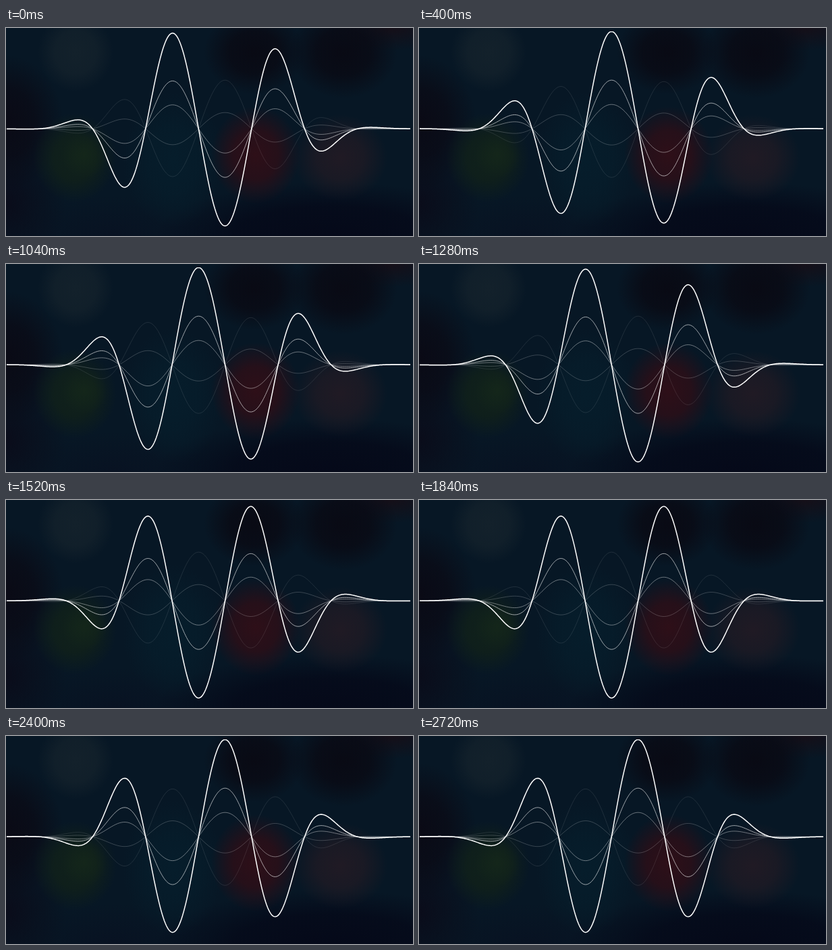
These frames come from a looping animation (603x308 px, 2800 ms). An HTML page with a canvas:

```html
<!DOCTYPE html>
<html lang="en">
<head>
<meta charset="utf-8">
<title>Wave</title>
<style>
  html, body { margin: 0; width: 100%; height: 100%; overflow: hidden; }
  body {
    position: relative;
    background:
      radial-gradient(circle at 116px 188px, #14261a 0, #14261a00 34px),
      radial-gradient(ellipse 62px 66px at 102px 192px, #10211b 0, #10201ae0 50%, #10201a00 100%),
      radial-gradient(ellipse 56px 58px at 103px 36px, #13212b 0, #13212bd0 55%, #13212b00 100%),
      radial-gradient(ellipse 66px 72px at 370px 188px, #2e0f18 0, #2a0f18e0 50%, #260f1800 100%),
      radial-gradient(ellipse 70px 64px at 495px 192px, #201a24 0, #1e1a24d0 50%, #1c192400 100%),
      radial-gradient(ellipse 75px 62px at 368px 36px, #090a14 0, #090a14d0 50%, #090a1400 100%),
      radial-gradient(ellipse 80px 68px at 500px 36px, #090a14 0, #090a14d0 50%, #090a1400 100%),
      radial-gradient(ellipse 90px 34px at 570px 0, #150f18 0, #150f1800 100%),
      radial-gradient(ellipse 85px 100px at 0 140px, #0a0a15 0, #0a0a15c0 50%, #0a0a1500 100%),
      radial-gradient(ellipse 90px 100px at 0 260px, #0a0c1a 0, #0a0c1a00 100%),
      radial-gradient(ellipse 75px 100px at 248px 195px, #061d2b 0, #061d2bc0 50%, #061d2b00 100%),
      radial-gradient(ellipse 260px 80px at 480px 308px, #050919 0, #050919d0 55%, #05091900 100%),
      radial-gradient(ellipse 150px 60px at 160px 308px, #081222 0, #08122200 100%),
      #071725;
  }
  #view { position: absolute; left: 1px; top: 5px; width: 598px; height: 290px; overflow: hidden; }
  canvas { display: block; }
</style>
</head>
<body>
<div id="view"><canvas id="poses"></canvas></div>
<script>
const W = 598, H = 290, POSES = 4, STEPS = 35, STEP_MS = 80;
const MID_X = 299.5, MID_Y = 144.2, UNIT = 150, AMP = 144;
const FREQ = 6, PHASE = -0.608;

// amplitude divisor, opacity, line width
const LINES = [
  [-2, 0.1, 1],
  [-6, 0.2, 1],
  [4, 0.4, 1],
  [2, 0.6, 1],
  [1, 1, 1.5]
];

const canvas = document.getElementById('poses');
canvas.width = W;
canvas.height = H * POSES;
const ctx = canvas.getContext('2d');

const envelope = x => Math.pow(4 / (4 + x ** 4), 4);

function drawLine(phase, divisor, alpha, width) {
  ctx.beginPath();
  for (let i = -200; i < 200; i++) {
    const x = i / 100;
    const y = envelope(x) * AMP / divisor * Math.sin(FREQ * x - phase);
    ctx.lineTo(MID_X + x * UNIT, MID_Y + y);
  }
  ctx.strokeStyle = `rgba(255,255,255,${alpha})`;
  ctx.lineWidth = width;
  ctx.stroke();
}

for (let k = 0; k < POSES; k++) {
  ctx.save();
  ctx.translate(0, k * H);
  ctx.beginPath();
  ctx.rect(0, 0, W, H);
  ctx.clip();
  for (const line of LINES) drawLine(PHASE + k * Math.PI / 2, ...line);
  ctx.restore();
}

// Each step shows the next quarter turn; the loop restarts mid-cycle.
const frames = Array.from({ length: STEPS + 1 }, (_, i) => ({
  offset: i / STEPS,
  transform: `translateY(${-H * (Math.min(i, STEPS - 1) % POSES)}px)`,
  easing: 'step-end'
}));
canvas.animate(frames, { duration: STEPS * STEP_MS, iterations: Infinity });
</script>
</body>
</html>
```
